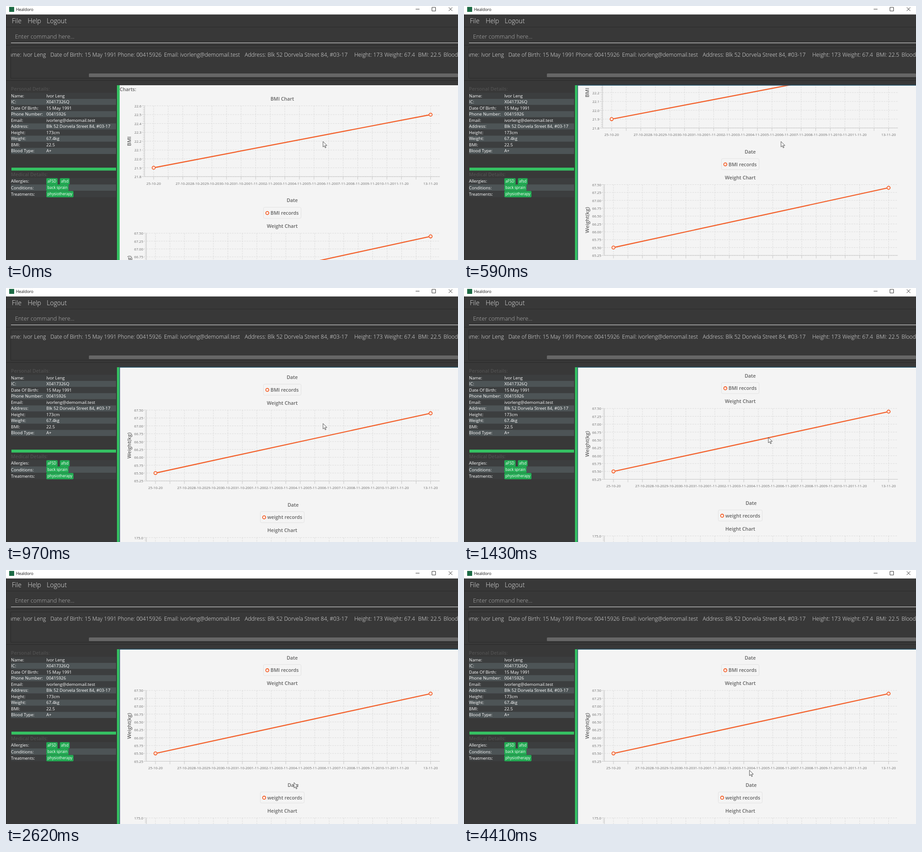
An HTML page that plays this animation: 998x561 px, repeating every 5110 ms.

```html
<!DOCTYPE html>
<html lang="en">
<head>
<meta charset="utf-8">
<title>Healdoro</title>
<style>
  html, body { margin: 0; width: 100%; height: 100%; overflow: hidden; background: #383838; }
  svg { display: block; font-family: "Open Sans", "Noto Sans", sans-serif; }
  text { white-space: pre; }
</style>
</head>
<body>
<svg id="stage" width="998" height="561" viewBox="0 0 998 561">
  <clipPath id="panelClip"><rect x="251" y="175" width="747" height="386"/></clipPath>
  <clipPath id="lineClip"><rect x="11" y="93" width="987" height="50"/></clipPath>
  <g id="frame"></g>
  <g clip-path="url(#panelClip)"><g id="charts"></g></g>
  <path id="focus" d="M251 561V175H998" fill="none" stroke="#1f5068" stroke-width="1.3"/>
  <path id="cursor" d="M0 0V12L2.8 9.4L4.8 14L6.6 13.2L4.7 8.8H8.6Z" fill="#fff" stroke="#222" stroke-width=".8"/>
</svg>
<script>
const LOOP = 5110;
const $ = id => document.getElementById(id);
const frame = $('frame'), charts = $('charts');

function add(parent, tag, attrs, content) {
  const el = document.createElementNS('http://www.w3.org/2000/svg', tag);
  for (const k in attrs) el.setAttribute(k, attrs[k]);
  if (content) el.textContent = content;
  parent.append(el);
  return el;
}
const rect = (parent, x, y, width, height, fill, more) =>
  add(parent, 'rect', { x, y, width, height, fill, ...more });
const line = (parent, d, stroke, width = 1, more) =>
  add(parent, 'path', { d, stroke, fill: 'none', 'stroke-width': width, ...more });
// y is the middle of the capital letters
const text = (parent, x, y, size, fill, str, more) =>
  add(parent, 'text', { x, y: y + size * .36, 'font-size': size, fill, ...more }, str);

const GREEN = '#35c162', ORANGE = '#f3622d', GREY = '#626262';
const ROWS = ['#3c3e3f', '#4d5456'];
const light = { 'font-weight': 300 }, semi = { 'font-weight': 600 };
const middle = { 'text-anchor': 'middle' }, end = { 'text-anchor': 'end' };

const user = {
  name: 'Ivor Leng', id: 'X0417326Q', born: '15 May 1991', phone: '00415926',
  email: 'ivorleng@demomail.test', address: 'Blk 52 Dorvela Street 84, #03-17'
};

function drawWindow() {
  rect(frame, 0, 0, 998, 561, '#383838');
  rect(frame, 0, 0, 998, 18.7, '#fff');
  rect(frame, 7, 2, 11, 11, '#1d6b45');
  text(frame, 22, 7.5, 8.9, '#111', 'Healdoro');
  line(frame, 'M904.5 7H913M940.5 3H948.5V11H940.5ZM977.5 3L985.5 11M985.5 3L977.5 11', '#333');

  line(frame, 'M.5 18.7V561M0 46.5H998M0 86.5H998M0 164.5H998M998 92.5H10.5V159.5H998', '#2a2a2a');
  [[13, 'File'], [48, 'Help'], [90, 'Logout']].forEach(([x, s]) =>
    text(frame, x, 33, 14.1, '#e8e8e8', s, light));
  text(frame, 20, 67.5, 12.8, '#b4b4b4', 'Enter command here...', light);
  rect(frame, 11, 81, 987, 1, '#e6e6e6');

  const result = add(frame, 'g', { 'clip-path': 'url(#lineClip)' });
  [[-2, 'Name:'], [38, user.name], [98, 'Date of Birth: ' + user.born], [246.5, 'Phone: ' + user.phone],
   [349, 'Email: ' + user.email], [527, 'Address: ' + user.address], [769, 'Height: 173'],
   [835.5, 'Weight: 67.4'], [910, 'BMI: 22.5'], [966, 'Blood Type: A+']
  ].forEach(([x, s]) => text(result, x, 107.5, 12.2, '#e8e8e8', s, light));
  rect(frame, 183, 149, 815, 8, '#666', { rx: 1.5 });
}

function drawDetails() {
  text(frame, 11, 183.5, 10.6, '#505050', 'Personal Details:', semi);
  [['Name:', user.name], ['IC:', user.id], ['Date Of Birth:', user.born], ['Phone Number:', user.phone],
   ['Email:', user.email], ['Address:', user.address], ['Height:', '173cm'], ['Weight:', '67.4kg'],
   ['BMI:', '22.5'], ['Blood Type:', 'A+']
  ].forEach(([label, value], i) => {
    const y = 198.3 + i * 13.53;
    rect(frame, 11, y - 6.7, 232, 13.53, ROWS[i % 2]);
    text(frame, 11, y, 9.5, '#fff', label);
    text(frame, 89, y, 9.5, '#fff', value);
  });

  rect(frame, 12, 357, 231, 6.5, GREEN);
  text(frame, 11, 372, 10.6, '#505050', 'Medical Details:', semi);
  [['Allergies:', [89, 25, 'aFSD'], [119, 21.5, 'afsd']],
   ['Conditions:', [89, 49, 'back sprain']],
   ['Treatments:', [89, 60, 'physiotherapy']]
  ].forEach(([label, ...tags], i) => {
    const y = 387 + i * 14.1;
    rect(frame, 11, y - 7, 232, 14.1, ROWS[i % 2]);
    text(frame, 11, y, 9.5, '#fff', label);
    for (const [x, w, s] of tags) {
      rect(frame, x, y - 6.8, w, 14.1, '#22ab53', { rx: 2 });
      text(frame, x + 2.5, y + .3, 8.3, '#fff', s);
    }
  });
  rect(frame, 245, 175, 6, 386, GREEN);
  rect(frame, 251, 175, 747, 386, '#f4f4f4');
}

function drawChart(c, i) {
  const g = add(charts, 'g', { transform: `translate(0 ${i * 281.5})` });
  const top = 220.4, bottom = 376.8, right = 958, { left } = c;
  const first = left + 20, pitch = (937.5 - first) / 19;
  const steps = Math.round((c.max - c.min) / c.step), gap = (bottom - top) / steps;
  const px = day => first + day * pitch;
  const py = v => bottom - (v - c.min) / c.step * gap;
  const title = (x, y, s, more) => text(g, x, y, 10.8, GREY, s, { ...semi, ...middle, ...more });

  let grid = '', ticks = `M${left} ${top}V${bottom}H${right}`;
  for (let n = 0; n <= steps; n++) {
    const y = bottom - n * gap;
    grid += `M${left} ${y}H${right}`;
    ticks += `M${left} ${y}h-6`;
    if (n < steps) for (let m = 1; m < 5; m++) ticks += `M${left} ${y - m * gap / 5}h-3.5`;
    text(g, left - 7, y + .5, 7.8, '#6c6c6c', (c.min + n * c.step).toFixed(c.digits), end);
  }
  for (let day = 0; day < 20; day++) {
    grid += `M${px(day)} ${top}V${bottom}`;
    ticks += `M${px(day)} ${bottom}v6.5`;
    if (day === 1 || day === 18) continue;
    const date = new Date(2020, 9, 25 + day);
    const label = [date.getDate(), date.getMonth() + 1].map(v => String(v).padStart(2, '0')).join('-') + '-20';
    text(g, px(day), 391.7, 7.85, '#6c6c6c', label, middle);
  }
  line(g, grid, '#dadada', .9, { 'stroke-dasharray': '3.4 2' });
  line(g, ticks, '#c2c2c2', .9);

  const [a, b] = c.values.map(py);
  line(g, `M${px(0)} ${a}L${px(19)} ${b}`, ORANGE, 2.4);
  const dot = (cx, cy) =>
    add(g, 'circle', { cx, cy, r: 3.4, fill: '#fff', stroke: ORANGE, 'stroke-width': 1.8 });
  dot(px(0), a);
  dot(px(19), b);

  title(610, 204.7, c.name + ' Chart');
  title((left + right) / 2, 429.5, 'Date');
  const mid = (top + bottom) / 2;
  title(272, mid, c.axis, { transform: `rotate(-90 272 ${mid})`, 'font-size': 11.2 });
  rect(g, 610 - c.legend / 2, 444.5, c.legend, 24.5, '#f4f4f4', { stroke: '#e2e2e2', rx: 3 });
  dot(618.5 - c.legend / 2, 457.2);
  title(625.5 - c.legend / 2, 457.2, c.series + ' records', { 'text-anchor': 'start' });
}

drawWindow();
drawDetails();
text(charts, 251, 184, 10.6, GREY, 'Charts:', semi);
[
  { name: 'BMI', axis: 'BMI', series: 'BMI', left: 306, min: 21.8, max: 22.6, step: .1, digits: 1, values: [21.9, 22.5], legend: 83 },
  { name: 'Weight', axis: 'Weight(kg)', series: 'weight', left: 310, min: 65.25, max: 67.5, step: .25, digits: 2, values: [65.5, 67.4], legend: 97 },
  { name: 'Height', axis: 'Height(cm)', series: 'height', left: 310, min: 170.5, max: 175, step: .5, digits: 1, values: [173, 173], legend: 95 }
].forEach(drawChart);

// Each entry holds from its time until the next one
const scroll = [
  [0, 0], [270, 12], [350, 33], [430, 57], [510, 82], [590, 107.4], [670, 128], [730, 145],
  [810, 159], [910, 203], [970, 232.2], [1060, 235.8]
];
const pointer = [
  [0, 700, 299.3],
  [1430, 672, 330], [1510, 590, 400], [1590, 490, 470], [1670, 431, 520], [1750, 470, 552], [1820, 560, 556], [1900, 621, 549],
  [1990, 617, 546], [2060, 613, 543],
  [2290, 615, 538], [2370, 620, 520], [2450, 627, 495], [2530, 633, 476], [2610, 636, 469.5], [2690, 638, 477], [2770, 638.5, 486],
  [2850, 638, 483], [2940, 637, 479.5],
  [3080, 636, 477.5], [3180, 635.3, 475.3],
  [4260, 634, 468], [4340, 632, 453], [4410, 630.3, 442.3]
];
const at = (track, t) => track.findLast(key => key[0] <= t).slice(1);

function draw() {
  const t = performance.now() % LOOP;
  charts.setAttribute('transform', `translate(0 ${-at(scroll, t)[0]})`);
  $('cursor').setAttribute('transform', `translate(${at(pointer, t)})`);
  $('focus').setAttribute('visibility', t < 70 ? 'hidden' : 'visible');
  requestAnimationFrame(draw);
}
draw();
</script>
</body>
</html>
```
